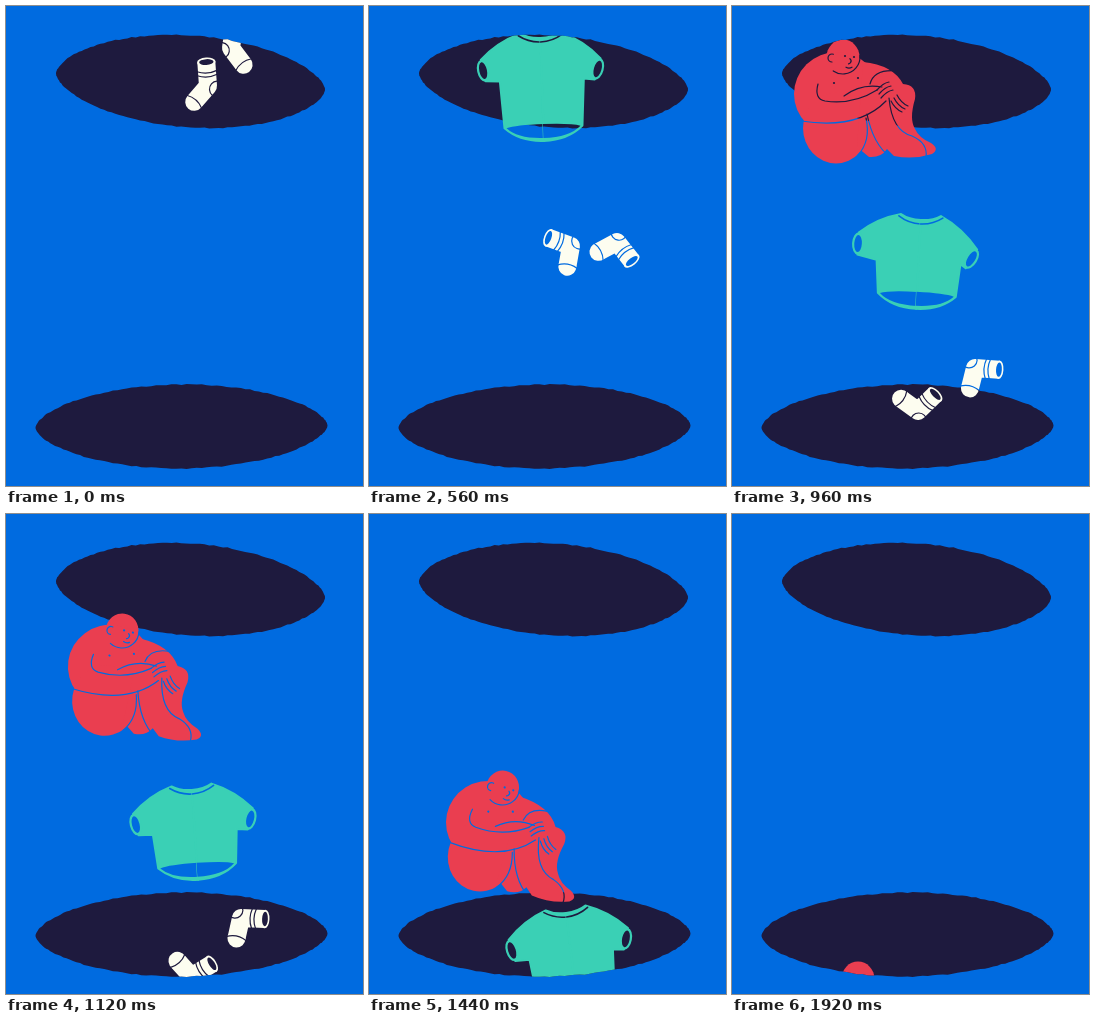
Write an HTML page with a canvas that moves like this. It is 357 px wide and 480 px high and loops after 2 s.

```html
<!DOCTYPE html>
<html>
<head>
<meta charset="utf-8">
<style>
  html, body { margin: 0; width: 100%; height: 100%; overflow: hidden; background: #006be0; }
  canvas { display: block; }
</style>
</head>
<body>
<canvas id="stage" width="357" height="480"></canvas>
<script>
const BLUE = '#006be0', NAVY = '#1e1a3e', CREAM = '#fdfdf0', TEAL = '#3ad0b5', RED = '#ea3e50';
const STEP = 80, STEPS = 25, DEG = Math.PI / 180;
const ctx = document.getElementById('stage').getContext('2d');
const sheet = document.createElement('canvas');
sheet.width = 357;
sheet.height = 480;
const g = sheet.getContext('2d');

let seed = 7;
const random = () => (seed = seed * 16807 % 2147483647) / 2147483647;

// Skewed ellipse with a slightly pointed, rough edge
function hole(x, y, rx, ry, skew) {
  const path = new Path2D();
  for (let a = 0; a < 360; a += 2) {
    const c = Math.cos(a * DEG), s = Math.sin(a * DEG);
    path.lineTo(x + rx * c, y + ry * s * Math.abs(s) ** 0.2 + skew * c + random() - 0.5);
  }
  path.closePath();
  return path;
}
const upperHole = hole(184.5, 75.5, 134.5, 46, 8);
const lowerHole = hole(175.5, 420.5, 146, 42, -1);

// Things show only from the upper hole's back rim to the lower hole's front rim
const shaft = new Path2D('M50 68L319 84L321 420L30 422Z');
shaft.addPath(upperHole);
shaft.addPath(lowerHole);

// Each key is [step, ...values]
function tween(keys, k) {
  const next = keys.findIndex(key => key[0] >= k);
  if (next < 1) return keys.at(next).slice(1);
  const a = keys[next - 1], b = keys[next], u = (k - a[0]) / (b[0] - a[0]);
  return a.slice(1).map((v, i) => v + (b[i + 1] - v) * u);
}

// Draw on a cleared sheet so that cut lines let the background through
function layer(color, x, y, turn, draw) {
  g.clearRect(0, 0, 357, 480);
  g.save();
  g.fillStyle = g.strokeStyle = color;
  g.lineJoin = 'round';
  g.translate(x, y);
  g.rotate(turn * DEG);
  draw();
  g.restore();
  ctx.drawImage(sheet, 0, 0);
}
function cutting(width) {
  g.globalCompositeOperation = 'destination-out';
  g.lineWidth = width;
  g.lineCap = 'round';
}
function oval(x, y, rx, ry, turn = 0) {
  g.beginPath();
  g.ellipse(x, y, rx, ry, turn, 0, 7);
  g.fill();
}
function arc(x, y, r, from = 0, to = 360) {
  g.beginPath();
  g.arc(x, y, r, from * DEG, to * DEG);
  g.stroke();
}
function line(d) {
  g.stroke(new Path2D(d));
}

// Keys: step, ankle x, ankle y, leg direction
const socks = [
  { side: 1, keys: [[0, 202,80, 86], [4, 204,194, 27], [7, 202,240, 20], [9, 200,306, 28],
    [12, 186,405, 136], [16, 185,520, 160]] },
  { side: -1, keys: [[0, 225,42, 98], [4, 229,158, 180], [7, 248,236, 232], [9, 255,297, 264],
    [12, 243,362, 184], [20, 211,530, 178]] }
];

// The leg lies along x and ends at the ankle; the foot folds away from it
function sock(side, bend) {
  const fx = Math.cos(bend), fy = Math.sin(bend), heel = 10 / Math.hypot(1 - fx, fy);
  g.scale(1, side);
  g.lineWidth = 18;
  g.beginPath();
  g.moveTo(-24, 0);
  g.lineTo(0, 0);
  g.lineTo(fx * 21, fy * 21);
  g.stroke();
  oval(fx * 21, fy * 21, 9, 9);
  oval(-24, 0, 4.5, 9.3);
  cutting(1.2);
  oval(-24, 0, 2.9, 7.2);
  for (const x of [-15, -11]) line(`M${x} -10q4 10 0 20`);
  arc((1 - fx) * heel, -fy * heel, 8);
  g.rotate(bend);
  line('M21 -10q-5 10 0 20');
}

// Keys: step, neck x, neck y, tilt, body length
const shirtKeys = [[4, 161,-84, -2, 94], [9, 178,101, -2, 94], [12, 189,209, 3, 80],
  [16, 182,333, -11, 82], [20, 211,455, -3, 84], [21, 212,505, -3, 84]];

function shirtHalf(side, swing, len) {
  const arm = (43 + side * swing) * DEG, lean = 2 * (arm - 36 * DEG);
  const cx = 20 + 51 * Math.cos(arm), cy = 2 + 51 * Math.sin(arm);
  const dx = -11 * Math.sin(lean), dy = 11 * Math.cos(lean);
  g.save();
  g.scale(side, 1);
  g.lineWidth = 2;
  g.beginPath();
  g.moveTo(0, 5);
  g.quadraticCurveTo(12, 5, 20, 0);
  g.quadraticCurveTo((20 + cx - dx) / 2 + 3, (cy - dy) / 2 - 5, cx - dx, cy - dy);
  g.lineTo(cx + dx, cy + dy);
  g.lineTo(42, 47);
  g.lineTo(39, len);
  g.quadraticCurveTo(24, len + 14, 0, len + 14);
  g.closePath();
  g.fill();
  g.stroke();
  oval(cx, cy, 6, 11, lean);
  cutting(1.6);
  oval(cx, cy, 3.8, 8.5, lean);
  line('M22 2Q12 9 0 9');
  g.fill(new Path2D(`M-.5 ${len - 3}Q28 ${len - 3} 37 ${len}Q26 ${len + 11} -.5 ${len + 11}`));
  g.restore();
}

// Keys: step, head x, head y, tilt
const personKeys = [[9, 108,-82, -6], [12, 111,51, 0], [14, 116,117, 8], [16, 142,201, 19],
  [20, 125,347, 5], [24, 126,465, 0]];

// Drawn around the centre of the head
function person() {
  oval(0, 0, 16.5, 17.5);
  oval(-6, 37, 43, 42);
  oval(-7, 71, 33, 35.5);
  g.fill(new Path2D(`M20 5Q50 8 60 27Q74 28 72 42Q66 62 72 72Q76 81 88 86
    Q97 92 89 97Q70 103 51 99L44 92Q38 101 26 100L14 90Z`));
  cutting(1.2);
  arc(0, 0, 17, -5, 125);
  arc(-11, 1, 4, 90, 290);
  arc(5, 4, 3, -50, 80);
  arc(6, 5, 6, 60, 120);
  for (const [x, y] of [[2, -1], [11, 0], [-9, 26], [15, 21]]) oval(x, y, 1.1, 1.1);
  line('M-25 27Q-29 42 -18 44Q10 48 34 33');   // near arm
  line('M-42 64Q15 73 43 44');
  line('M1 39Q18 26 39 30M27 27Q31 11 56 14'); // far arm
  line('M24 57Q30 87 47 100M15 98Q28 84 23 61'); // thighs
  line('M46 41Q49 74 69 79Q85 86 83 100');     // shin and far foot
  for (let i = 0; i < 3; i++) {
    line(`M${34 + 2 * i} ${33 + 4 * i}q6 -7 12 -8`);
    line(`M${48 + 3 * i} ${44 - 3 * i}q4 8 11 11`);
  }
}

function frame(now) {
  const k = Math.floor(now / STEP) % STEPS;
  ctx.fillStyle = BLUE;
  ctx.fillRect(0, 0, 357, 480);
  ctx.fillStyle = NAVY;
  ctx.fill(upperHole);
  ctx.fill(lowerHole);
  ctx.save();
  ctx.clip(shaft);

  const bend = Math.min(80, 45 + 8 * k) * DEG;
  for (const { side, keys } of socks) layer(CREAM, ...tween(keys, k), () => sock(side, bend));

  const [x, y, tilt, len] = tween(shirtKeys, k);
  const swing = 8 * Math.cos((k - 12.5) / 7 * 2 * Math.PI);
  layer(TEAL, x, y, tilt, () => [-1, 1].forEach(side => shirtHalf(side, swing, len)));

  layer(RED, ...tween(personKeys, k), person);
  ctx.restore();
}

const start = performance.now();
function loop() {
  frame(performance.now() - start);
  requestAnimationFrame(loop);
}
loop();
</script>
</body>
</html>
```
